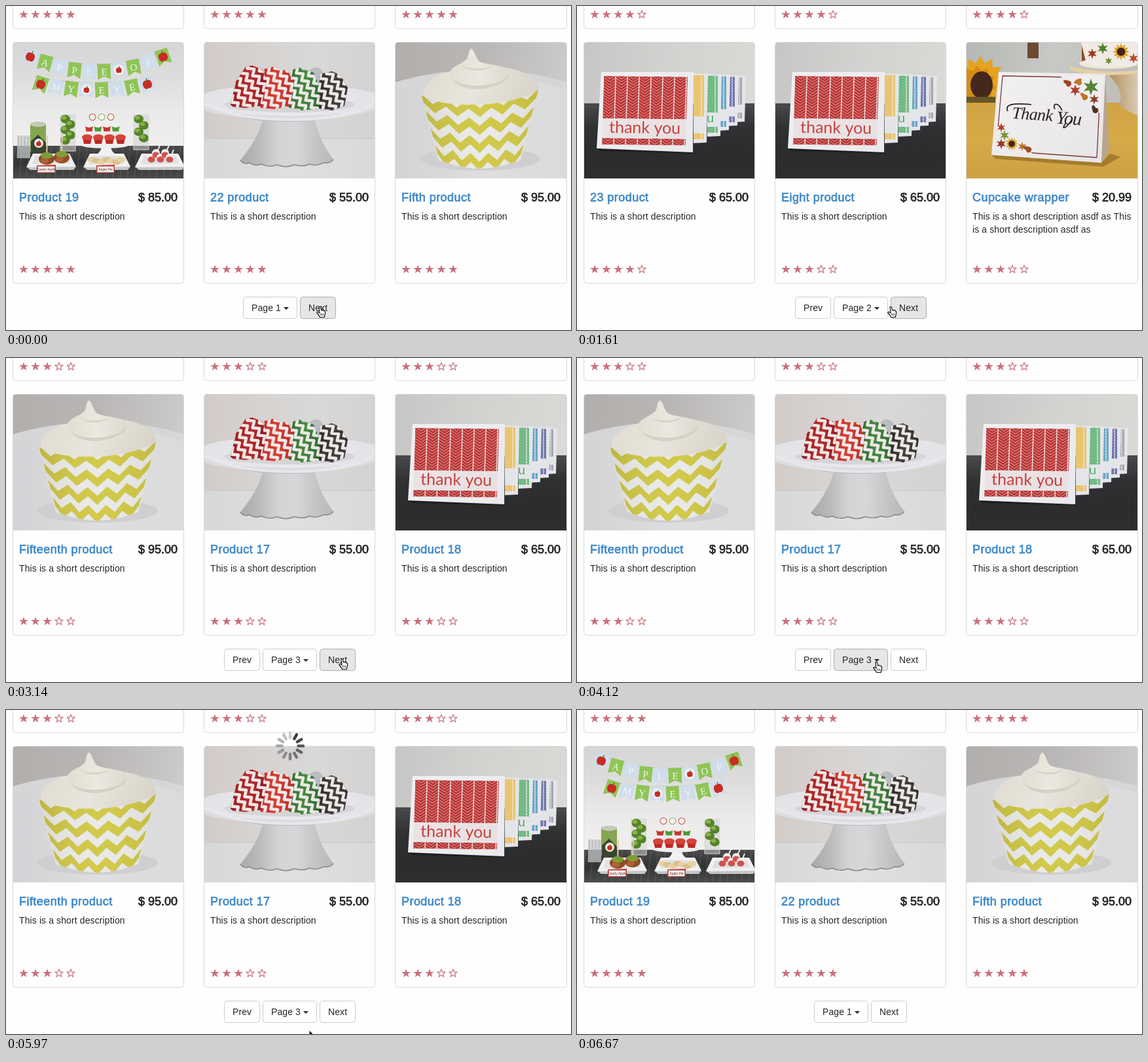
Animation of 863x496 px, one loop 8010 ms. Source, as an HTML page with a canvas:

```html
<!DOCTYPE html>
<html lang="en">
<head>
<meta charset="utf-8">
<title>Product list</title>
<style>
html, body { margin: 0; width: 100%; height: 100%; overflow: hidden; background: #fefefe; }
canvas { display: block; }
</style>
</head>
<body>
<canvas id="stage" width="863" height="496"></canvas>
<script>
const LOOP = 8010, TAU = Math.PI * 2;
const SANS = '"Liberation Sans", Arial, sans-serif';
const stage = document.getElementById('stage').getContext('2d');
let c = stage;

// ---------- drawing helpers ----------
const lerp = (a, b, k) => a + (b - a) * k;

function trace(pts, close = true) {
  c.beginPath();
  for (let i = 0; i < pts.length; i += 2) c.lineTo(pts[i], pts[i + 1]);
  if (close) c.closePath();
}
function poly(fill, ...pts) {
  trace(pts);
  c.fillStyle = fill;
  c.fill();
}
function line(color, width, ...pts) {
  trace(pts, false);
  c.strokeStyle = color;
  c.lineWidth = width;
  c.stroke();
}
function oval(fill, x, y, rx, ry = rx, turn = 0) {
  c.beginPath();
  c.ellipse(x, y, rx, ry, turn, 0, TAU);
  c.fillStyle = fill;
  c.fill();
}
function rect(fill, x, y, w, h) {
  c.fillStyle = fill;
  c.fillRect(x, y, w, h);
}
function shade(x0, y0, x1, y1, ...colors) {
  const g = c.createLinearGradient(x0, y0, x1, y1);
  colors.forEach((s, i) => g.addColorStop(i / (colors.length - 1), s));
  return g;
}
function shape(fill, d) {
  c.fillStyle = fill;
  c.fill(new Path2D(d));
}
function box(x, y, w, h, r, fill, border) {
  c.beginPath();
  c.roundRect(x + .5, y + .5, w - 1, h - 1, r);
  c.fillStyle = fill;
  c.fill();
  c.strokeStyle = border;
  c.lineWidth = 1;
  c.stroke();
}
function text(s, x, y, font, color, gap = 0, align = 'left') {
  c.font = font;
  c.fillStyle = color;
  c.letterSpacing = gap + 'px';
  c.textAlign = align;
  c.fillText(s, x, y);
}
function medium(s, x, y, color, gap, align) {
  text(s, x, y, '18px ' + SANS, color, gap, align);
  c.strokeStyle = color;
  c.lineWidth = .75;
  c.strokeText(s, x, y);
}
function starPath(x, y, r, inner = .4, n = 5) {
  c.beginPath();
  for (let i = 0; i < n * 2; i++) {
    const a = i * Math.PI / n - Math.PI / 2, q = i % 2 ? r * inner : r;
    c.lineTo(x + q * Math.cos(a), y + q * Math.sin(a));
  }
  c.closePath();
}
function burst(fill, x, y, r, inner, n) {
  starPath(x, y, r, inner, n);
  c.fillStyle = fill;
  c.fill();
}

// ---------- photos, drawn in stage coordinates ----------
function photo(x, paint) {
  const pic = document.createElement('canvas');
  pic.width = 262;
  pic.height = 208;
  c = pic.getContext('2d');
  c.translate(-x, -56);
  c.lineJoin = 'round';
  paint();
  c = stage;
  return pic;
}

function cupcake() {
  rect(shade(595, 56, 857, 90, '#b1aeac', '#b9b7b6', '#cccbca'), 595, 56, 262, 208);
  oval('#d6d6d8', 726, 192, 218, 94);
  oval(shade(595, 0, 857, 0, '#d3d3d6', '#dededf', '#dbdbdd'), 726, 200, 206, 92);
  oval('#cfcfd2', 724, 234, 92, 18);
  const at = (u, v, dy = 0) => [
    lerp(lerp(633, 660, v), lerp(815, 786, v), u),
    lerp(137, 236, v) - 9 * u * (1 - v) + 13 * Math.sin(Math.PI * u) + dy
  ];
  const edge = (v, zig) => {
    const out = [];
    for (let i = 0; i <= 10; i++) out.push(at(i / 10, v, zig ? (i % 2 ? 6.5 : -6.5) : 0));
    return out;
  };
  const outline = edge(0).concat(edge(1).reverse()).flat();
  c.save();
  trace(outline);
  c.clip();
  rect('#e9e9e8', 620, 120, 210, 140);
  for (let k = 0; k < 4; k++) {
    const v = k * .265 + .04;
    poly(shade(635, 0, 812, 0, '#c9c140', '#d2ca4a', '#ccc442'),
      ...edge(v, true).concat(edge(v + .135, true).reverse()).flat());
  }
  rect(shade(633, 0, 815, 0, 'rgba(90,80,40,.12)', 'rgba(255,255,255,0)', 'rgba(90,80,40,.09)'), 620, 120, 210, 140);
  c.restore();
  const cream = shade(640, 70, 805, 145, '#dfdbd1', '#e9e5dc', '#d8d3c9');
  shape(cream, 'M637 137C638 116 656 105 680 100C720 86 782 92 801 108C812 117 814 123 813 129C780 146 746 151 716 151C680 152 656 148 637 137Z');
  shape('#d6d1c6', 'M677 103C684 122 742 128 768 104C774 114 736 132 706 126C690 123 680 114 677 103Z');
  shape(shade(675, 0, 775, 0, '#e1ddd3', '#ebe8df', '#dcd7cd'), 'M678 104C678 92 696 90 704 81C707 77 706 66 711 65C716 68 717 80 723 85C736 91 764 90 768 99C770 113 741 123 716 122C696 121 679 115 678 104Z');
  shape('#d9d5ca', 'M697 91C709 97 729 97 743 91C735 101 706 102 697 91Z');
}

// a wrapper lying on its side, so its chevrons run downwards
function wrapper(color, dark, ...pts) {
  c.save();
  trace(pts);
  c.clip();
  const x = pts[0], y = pts[1];
  rect(shade(x, 0, x + 55, 0, dark, color, dark), x - 10, 85, 80, 80);
  c.translate(x + 26, y - 30);
  c.rotate(.95);
  for (let r = -56; r < 56; r += 12.5) {
    const zig = [];
    for (let i = -8; i <= 8; i++) zig.push(i * 7, r + (i % 2 ? 4 : -4));
    line('#ece8e6', 4.6, ...zig);
  }
  c.restore();
}

function cakeStand() {
  rect(shade(303, 56, 564, 80, '#d2cbc8', '#d6d3d1', '#d9d8d7', '#d3d3d2'), 303, 56, 262, 208);
  rect(shade(303, 0, 564, 0, '#d6d8d7', '#dfe0df', '#d8dad9'), 303, 203, 262, 61);
  rect('#cbcccb', 303, 202, 262, 1.5);
  shape(shade(358, 0, 502, 0, '#a9abab', '#b9bbbb', '#d3d4d5', '#d5d6d7', '#c4c5c6', '#b5b7b7'),
    'M394 166C390 190 376 214 358 236Q363 243 372 240Q380 246 390 242Q402 248 414 243Q428 249 440 243Q454 247 464 242Q475 246 484 240Q494 242 500 235C484 214 474 190 470 166Z');
  c.strokeStyle = '#858888';
  c.lineWidth = 1.5;
  c.stroke(new Path2D('M358 236Q363 243 372 240Q380 246 390 242Q402 248 414 243Q428 249 440 243Q454 247 464 242Q475 246 484 240Q494 242 500 235'));
  shape('#b9babc', 'M303 148C350 174 390 177 433 177C486 177 526 170 564 149L564 140L303 140Z');
  oval('#dcdde1', 433, 147, 146, 27);
  oval(shade(303, 0, 564, 0, '#e2e2e7', '#eaeaee', '#e2e2e7'), 433, 144, 144, 24);
  oval('#d5d5da', 433, 151, 100, 12);
  shape('#e8e8ec', 'M303 146C350 169 390 172 433 172C486 172 526 166 564 146L564 153C526 171 486 176 433 176C386 176 342 170 303 152Z');
  oval('#b9bcc2', 473, 108, 12, 14);
  wrapper('#47403f', '#302829', 474, 152, 480, 104, 498, 100, 511, 106, 522, 125, 517, 153, 498, 160, 478, 157);
  wrapper('#468a40', '#2f6730', 428, 151, 435, 99, 447, 94, 470, 102, 479, 124, 478, 157, 452, 160, 433, 156);
  wrapper('#d83f36', '#bb2d28', 385, 151, 394, 97, 407, 93, 431, 100, 440, 118, 434, 153, 411, 158, 390, 156);
  wrapper('#b92d2c', '#951a1d', 343, 151, 351, 116, 366, 93, 376, 91, 391, 97, 398, 114, 390, 153, 365, 156, 346, 154);
}

function herring(x, y, w, h, color, pitch = 18) {
  c.save();
  c.beginPath();
  c.rect(x, y, w, h);
  c.clip();
  rect(color, x, y, w, h);
  for (let r = y - 6; r < y + h + 8; r += 4.4) {
    const zig = [];
    for (let i = 0; i * pitch / 2 <= w + pitch; i++) zig.push(x + i * pitch / 2, r + (i % 2 ? 6 : 0));
    line('rgba(250,235,235,.55)', 1, ...zig);
  }
  for (let k = x + pitch; k < x + w; k += pitch) line('#f2e6e6', 1.4, k, y, k, y + h);
  c.restore();
}

function thankYou() {
  rect(shade(11, 56, 271, 100, '#c6c7c5', '#d2d3d0', '#d9d9d6'), 11, 56, 262, 208);
  rect(shade(0, 147, 0, 264, '#4b4c4d', '#303133', '#2b2c2e', '#2d2e30'), 11, 149, 262, 115);
  const back = [['#8d929d', 258, 177], ['#46549c', 247, 183], ['#3f93bd', 234, 190], ['#4cad65', 221, 199], ['#e5bb4c', 200, 209]];
  back.forEach(([ink, right, foot], i) => {
    const top = 107 - i * .8, left = right - 22;
    poly('#e4e5e9', left, top, right, top, right - 2, foot, left, foot + 1);
    c.globalAlpha = .85;
    herring(left, top + 2, 16, (foot - top) * .6, ink, 12);
    herring(left, foot - 14, 16, 9, ink, 12);
    c.globalAlpha = 1;
  });
  text('u', 198, 178, '20px Lato, sans-serif', '#4cad65');
  poly('rgba(0,0,0,.3)', 30, 218, 177, 224, 182, 226, 36, 222);
  poly(shade(30, 100, 178, 224, '#f0eff2', '#e9e9ed'), 37, 101, 178, 101, 177, 224, 30, 218);
  c.save();
  c.transform(1, .012, -.03, 1, 3.4, -.5);
  herring(41, 107, 128, 65, '#b93231');
  c.globalAlpha = .13;
  herring(41, 172, 128, 29, '#cf9c9c');
  c.globalAlpha = 1;
  herring(41, 202, 128, 10, '#b53230');
  c.restore();
  c.save();
  c.translate(49, 194);
  c.rotate(.015);
  text('thank you', 0, 0, '25px Lato, sans-serif', '#c8413d');
  c.restore();
}

function sunflower(x, y, r) {
  burst('#e2a022', x, y, r, .62, 12);
  oval('#40251a', x, y, r * .48);
}
const leaf = (fill, x, y, r) => burst(fill, x, y, r, .42, 6);
function sprig(fill, x, y, turn) {
  oval(fill, x, y, 6.5, 3, turn);
  oval(fill, x + 2, y + 2, 4, 4.5, turn);
}

function autumn() {
  rect(shade(595, 56, 857, 100, '#b4b8b3', '#c8c9c6', '#bdbcb7'), 595, 56, 262, 208);
  rect(shade(0, 140, 0, 264, '#cfa244', '#d6aa47', '#cda142'), 595, 148, 262, 116);
  rect('#6b4932', 688, 56, 17, 24);
  rect('#8a4c2b', 771, 56, 86, 34);
  oval('#efe7da', 812, 88, 45, 8);
  shape('#f0ebe4', 'M770 56L857 56L857 90Q816 98 778 88Z');
  sunflower(831, 70, 13);
  leaf('#4e7d2b', 803, 65, 9);
  leaf('#a1371f', 787, 73, 8);
  leaf('#ba4a22', 850, 80, 8);
  leaf('#6f8b2f', 812, 84, 6);
  shape('#e6d0a2', 'M753 93Q805 105 857 98L857 105Q799 111 753 98Z');
  shape(shade(812, 0, 857, 0, '#b28f5c', '#dacbb4'), 'M812 106L857 104L857 168Q838 160 828 152Q838 130 812 106Z');
  burst('#e6a31d', 616, 115, 39, .72, 13);
  burst('#d58c16', 611, 121, 30, .75, 11);
  oval('#43281b', 618, 121, 17, 21);
  rect('#67552a', 595, 139, 44, 9);
  poly('rgba(110,75,20,.45)', 633, 228, 801, 240, 814, 226, 830, 231, 804, 246, 640, 234);
  poly('#b8a58d', 807, 104, 813, 222, 801, 240);
  poly(shade(640, 100, 800, 240, '#f2f0f0', '#e7e5e8'), 644, 101, 807, 104, 801, 240, 633, 228);
  trace([650, 107, 800, 110, 794, 232, 640, 221]);
  c.strokeStyle = '#7e3931';
  c.lineWidth = 1.3;
  c.stroke();
  poly('#efedee', 738, 107, 803, 107, 800, 166);
  poly('#edeaec', 637, 178, 637, 224, 697, 227);
  sprig('#9d4426', 749, 117, .4);
  sprig('#c17928', 765, 115, -.5);
  leaf('#af3b24', 761, 129, 9);
  leaf('#568536', 785, 124, 13);
  sprig('#bd7627', 774, 138, .8);
  leaf('#8b4124', 790, 143, 8);
  sprig('#51321f', 790, 158, 1.2);
  leaf('#b73c28', 648, 186, 7);
  leaf('#7d943a', 653, 198, 8);
  leaf('#9c3424', 648, 211, 8);
  sunflower(664, 211, 10);
  leaf('#ba7128', 680, 215, 7);
  sprig('#985025', 688, 218, .3);
  c.save();
  c.translate(664, 172);
  c.rotate(.07);
  text('Thank', 0, 0, 'italic 26px "Liberation Serif", serif', '#28221f', -.6);
  text('You', 68, 3, 'italic 28px "Liberation Serif", serif', '#28221f', -1);
  c.restore();
  c.strokeStyle = '#28221f';
  c.lineWidth = 1.7;
  c.stroke(new Path2D('M658 161C653 151 664 148 694 151M730 158C725 149 735 146 741 160M756 174C746 189 738 190 747 179'));
}

function apple(x, y, r) {
  oval('#c92b26', x - r * .35, y, r * .72, r);
  oval('#c92b26', x + r * .35, y, r * .72, r);
  line('#4a6b22', 1.3, x, y - r * .7, x + 1.5, y - r * 1.5);
}
// marks: * is an apple, o is an apple on a white disc
function flag(x, y, green, mark, turn) {
  c.save();
  c.translate(x, y);
  c.rotate(turn);
  poly(green ? '#8fc556' : '#cfddec', -10, -12, 10, -12, 10, 12, 0, 7, -10, 12);
  if (mark === 'o') oval('#eef0ec', 0, -1, 8);
  if (mark === 'o') apple(0, 0, 4);
  else if (mark === '*') apple(0, 0, 6.5);
  else text(mark, 0, 5, '15px "Liberation Serif", serif', '#f4f6f4', 0, 'center');
  c.restore();
}
function bunting(marks, x0, x1, y, lift, first) {
  const sag = k => y - lift * (2 * k - 1) ** 2;
  const cord = [];
  for (let i = 0; i <= 12; i++) cord.push(lerp(x0 - 10, x1 + 10, i / 12), sag(i / 12) - 12);
  line('#c3c7ca', 1, ...cord);
  [...marks].forEach((m, i) => {
    const k = i / (marks.length - 1);
    flag(lerp(x0, x1, k), sag(k), (i + first) % 2, m, (.5 - k) * .65);
  });
}
function vase(x, y, w, h, apples) {
  rect('rgba(205,210,205,.5)', x, y, w, h);
  for (let i = 0; i < apples; i++) {
    const ax = x + w / 2 + (i % 2 ? 4 : -4), ay = y + 7 + i * (h - 15) / apples;
    oval('#55822a', ax, ay, 7.5, 6.5);
    oval('#86b245', ax - 2, ay - 2, 4, 3);
  }
  line('#d9dcda', 1, x, y, x, y + h, x + w, y + h, x + w, y);
}
function tray(x, w) {
  poly('#c4c5c7', x - 2, 246, x + w + 2, 246, x + w - 2, 251, x + 4, 251);
  poly('#f0f0f1', x + 8, 226, x + w - 8, 226, x + w + 2, 246, x - 2, 247);
  poly('#e0e0e2', x + 12, 230, x + w - 12, 230, x + w - 7, 241, x + 7, 242);
}
function sign(s, x, y, w) {
  poly('#bd3430', x, y, x + w, y - 1, x + w, y + 11, x, y + 12);
  rect('#f3efec', x + 1.5, y + 1.5, w - 3, 9);
  text(s, x + w / 2, y + 8, '5px ' + SANS, '#6a3430', 0, 'center');
}

function party() {
  rect(shade(0, 56, 0, 214, '#d6d5d6', '#dedddd', '#ebeaea', '#f0efee'), 11, 56, 262, 158);
  rect(shade(0, 214, 0, 264, '#4a4a4a', '#323334', '#4a4b4b'), 11, 214, 262, 50);
  for (let x = 14; x < 272; x += 11) line('rgba(150,150,150,.16)', 2, x, 214, x - 5, 264);
  bunting('*APPLEoOF*', 37, 240, 101, 23, 0);
  bunting('*MYoEYE*', 53, 216, 129, 9, 1);
  vase(83, 166, 23, 56, 5);
  vase(195, 166, 23, 54, 4);
  rect('#86a552', 37, 182, 24, 41);
  oval('#c4c9b8', 49, 181, 12, 4);
  poly('#3a4630', 38, 207, 49, 197, 61, 209, 61, 224, 38, 224);
  oval('#f3eee5', 50, 210, 7);
  apple(50, 211, 3.5);
  rect('rgba(200,203,203,.7)', 17, 198, 20, 35);
  for (let i = 0; i < 4; i++) line('#a8acab', 1, 19 + i * 5, 200, 17 + i * 5, 232);
  shape('#f1f1f1', 'M146 214L160 214Q160 224 171 229L135 229Q146 224 146 214Z');
  oval('#eeeeee', 151, 213, 36, 5);
  oval('#e9e9e9', 150, 194, 30, 4);
  oval('#efefef', 151, 177, 20, 3);
  for (let i = 0; i < 3; i++) {
    const x = 132 + i * 14;
    oval(i === 1 ? '#8fbd70' : '#cf6660', x, 170, 5.5);
    oval('#f3f1ee', x, 170, 4.3);
  }
  for (let i = 0; i < 4; i++) {
    const x = 127 + i * 13.5, red = i % 2 === 0;
    poly(red ? '#c83730' : '#4e9b37', x - 6, 184, x + 6, 184, x + 4.5, 192, x - 4.5, 192);
    oval('#f1efec', x, 183, 6, 3);
    const bx = 124 + i * 17;
    poly('#bd2623', bx - 7, 202, bx + 7, 202, bx + 5, 211, bx - 5, 211);
    oval('#d6433b', bx, 201, 8, 4.5);
  }
  tray(33, 72);
  tray(120, 68);
  tray(199, 72);
  [[62, 234], [85, 232]].forEach(([x, y]) => {
    line('#e1cba5', 2, x, y, x + 1, 198);
    oval('#8f4d25', x, y, 12, 9);
    oval('#7f9d36', x, y - 5, 9, 5);
    oval('#b06235', x - 3, y + 3, 6, 4);
  });
  for (let i = 0; i < 7; i++) oval(i % 2 ? '#dcc08c' : '#e8d2a2', 131 + i * 7.5, 237 + (i % 3) * 2 - 2, 7, 4);
  for (let i = 0; i < 5; i++) {
    const x = 222 + i * 7, y = 235 - i % 2 * 7;
    line('#f3f2f1', 2, x, y, x + 6, y - 15);
    oval('#f4efee', x, y - 3, 6);
    oval('#d0524f', x, y, 5.5, 4.5);
  }
  sign('Candy Apple', 47, 244, 29);
  sign('Apple Pie', 138, 244, 28);
}

const pics = {
  party: photo(11, party),
  stand: photo(303, cakeStand),
  cup: photo(595, cupcake),
  card: photo(11, thankYou),
  fall: photo(595, autumn)
};

// ---------- page content ----------
const SHORT = 'This is a short description';
const pages = [
  { top: 5, items: [['party', 'Product 19', '85.00', 5], ['stand', '22 product', '55.00', 5], ['cup', 'Fifth product', '95.00', 5]] },
  { top: 4, items: [['card', '23 product', '65.00', 4], ['card', 'Eight product', '65.00', 3],
    ['fall', 'Cupcake wrapper', '20.99', 3, [SHORT + ' asdf as This', 'is a short description asdf as']]] },
  { top: 3, items: [['cup', 'Fifteenth product', '95.00', 3], ['stand', 'Product 17', '55.00', 3], ['card', 'Product 18', '65.00', 3]] }
];

function rating(x, y, score) {
  for (let i = 0; i < 5; i++) {
    const full = i < score;
    starPath(x + 17 + i * 18, y + .2, full ? 7.3 : 6.2, full ? .39 : .45);
    c.fillStyle = c.strokeStyle = '#c9717d';
    c.lineWidth = 1.2;
    full ? c.fill() : c.stroke();
  }
}

function drawCard(i, [pic, title, price, score, lines = [SHORT]], top) {
  const x = [10, 302, 594][i], w = i === 2 ? 263 : 262;
  box(x, -60, w, 95, 4, '#fefefe', '#d9d9d9');
  rating(x, 13, top);
  box(x, 55, w, 370, 4, '#fefefe', '#d9d9d9');
  c.save();
  c.beginPath();
  c.roundRect(x + 1, 56, w - 2, 208, [3, 3, 0, 0]);
  c.clip();
  c.drawImage(pics[pic], x + 1, 56);
  c.restore();
  medium(title, x + 10, 299, '#428bca', .45);
  medium('$ ' + price, x + w - 10, 299, '#262626', 0, 'right');
  lines.forEach((s, n) => text(s, x + 10, 327 + n * 20, '14px ' + SANS, '#262626', .11));
  rating(x, 403, score);
}

function button(label, x, w, hover, focus, open) {
  if (focus) {
    c.beginPath();
    c.roundRect(x - 1, 444, w + 2, 36, 5);
    c.strokeStyle = '#a3b0c8';
    c.lineWidth = 3;
    c.stroke();
  }
  box(x, 445, w, 34, 4, hover || open ? '#e6e6e7' : '#fefefe', hover || open ? '#adadad' : '#cccccc');
  if (open) rect(shade(0, 446, 0, 452, 'rgba(0,0,0,.13)', 'rgba(0,0,0,0)'), x + 1, 446, w - 2, 6);
  text(label, x + 13, 467, '14px ' + SANS, '#262626', .08);
  if (w > 60) poly('#262626', x + 62, 461, x + 70, 461, x + 66, 465);
}

function menu() {
  c.save();
  c.shadowColor = 'rgba(0,0,0,.175)';
  c.shadowBlur = 12;
  c.shadowOffsetY = 6;
  box(392, 481, 160, 140, 4, '#fefefe', '#c9c9c9');
  c.restore();
  rect('#f5f5f5', 393, 487, 158, 26);
  text('Page 1', 413, 506, '14px ' + SANS, '#262626');
}

function spinner(turn) {
  c.save();
  c.translate(434, 55);
  c.lineCap = 'round';
  for (let i = 0; i < 12; i++) {
    const a = (i + turn) * TAU / 12, g = Math.round(lerp(62, 205, i / 11));
    line(`rgb(${g},${g},${g})`, 4.4, 12.5 * Math.sin(a), -12.5 * Math.cos(a), 20 * Math.sin(a), -20 * Math.cos(a));
  }
  c.restore();
}

// ---------- pointer ----------
const HAND = new Path2D('M4 2Q5 .5 6.5 2L7.5 7L9 6.2L10.3 7.2L12 7.2L13.5 9L13.5 12L12 17.5L5.5 17.5L4 14.5L1 11Q.3 9 2.5 9.3L5 11Z');
const ARROW = new Path2D('M0 0L0 15L3.6 11.7L6 17L8.4 16L6 10.8L11 10.8Z');
const moves = [
  [0, 474, 459], [2420, 478, 459], [2510, 489, 459], [2600, 502, 459], [2690, 508, 459],
  [3860, 502, 460], [3950, 482, 462], [4030, 462, 463], [4120, 452, 464], [4210, 448, 464],
  [4750, 451, 469], [4840, 460, 482], [4930, 467, 493], [5360, 466, 493], [5450, 463, 492],
  [5530, 461, 491], [5620, 459, 491], [5710, 463, 490], [6500, 560, 486], [6580, 762, 484], [6670, 900, 520]
];

function pointer(t) {
  const [, x, y] = moves.filter(m => m[0] <= t).pop();
  const arrow = t >= 5710;
  c.save();
  c.translate(x, y);
  c.lineJoin = 'round';
  c.fillStyle = arrow ? '#111' : '#fff';
  c.strokeStyle = arrow ? '#fff' : '#111';
  c.lineWidth = arrow ? 1 : 1.2;
  c.fill(arrow ? ARROW : HAND);
  c.stroke(arrow ? ARROW : HAND);
  if (!arrow) for (let i = 0; i < 3; i++) line('#222', .8, 6.5 + i * 2, 11.5, 6.5 + i * 2, 15);
  c.restore();
}

// ---------- timeline ----------
const within = (t, a, b) => t >= a && t < b;

function render(t) {
  const n = t < 1610 || t >= 6050 ? 1 : t < 3140 ? 2 : 3;
  const page = pages[n - 1];
  rect('#fefefe', 0, 0, 863, 496);
  page.items.forEach((item, i) => drawCard(i, item, page.top));

  const open = within(t, 4390, 5710);
  const left = n === 1 ? 362 : 392;
  if (n > 1) button('Prev', 333, 55);
  button('Page ' + n, left, 83, within(t, 4030, 4390), false, open);
  button('Next', left + 87, 55, t < 3950, within(t, 1350, 1610) || within(t, 2960, 3140));
  if (open) menu();

  if (within(t, 1440, 1610)) spinner(t < 1520 ? 0 : 1);
  if (within(t, 3050, 3140)) spinner(1);
  if (within(t, 5880, 6050)) spinner(t < 5970 ? 0 : 1);
  pointer(t);
}

const start = performance.now();
function tick() {
  render((performance.now() - start) % LOOP);
  requestAnimationFrame(tick);
}
tick();
</script>
</body>
</html>
```
